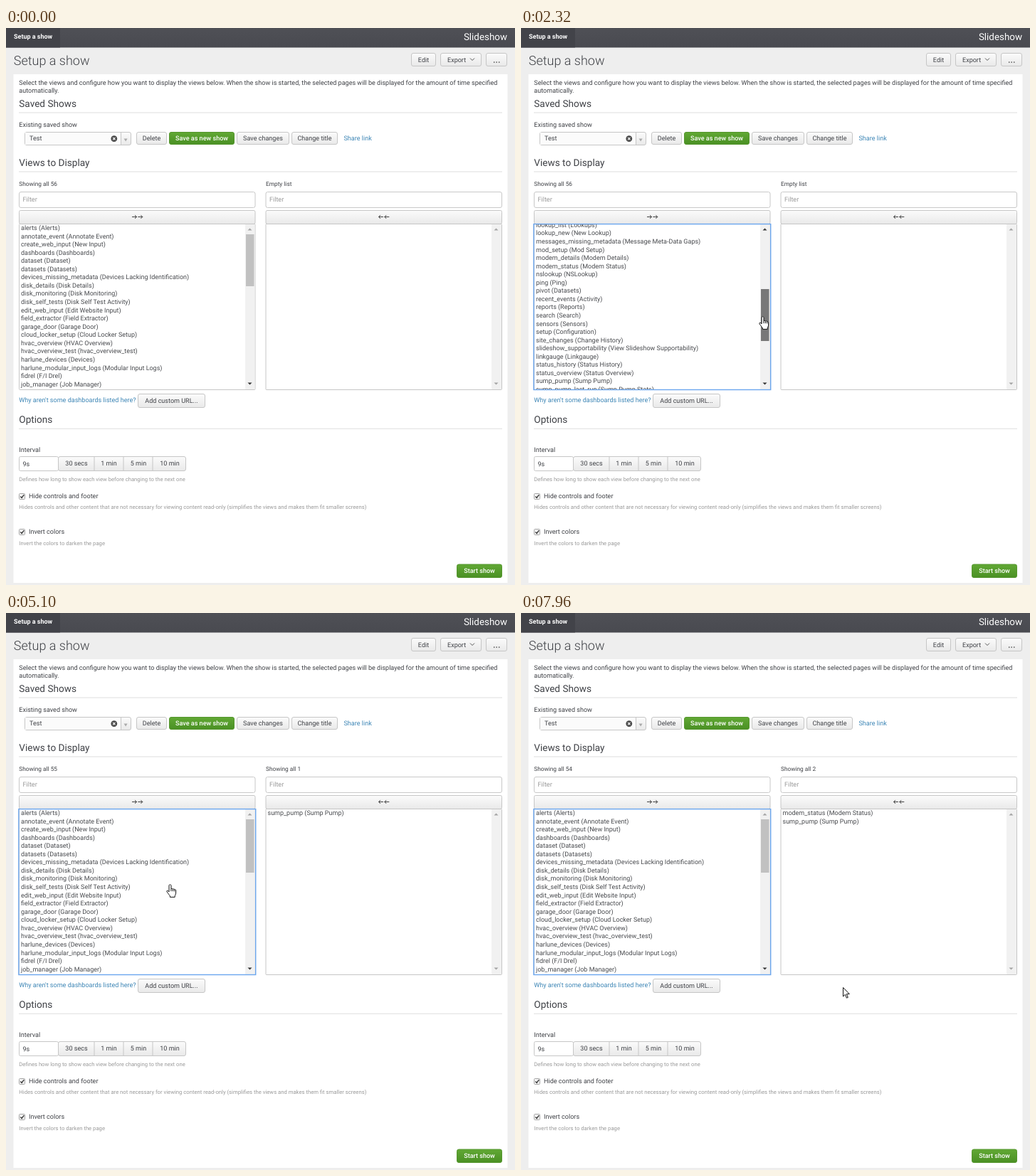
Write an HTML page that moves like this. It is 715 by 783 pixels and loops after 8000 ms.

```html
<!DOCTYPE html>
<html lang="en">
<head>
<meta charset="utf-8">
<title>Setup a show</title>
<style>
html, body { margin: 0; width: 100%; height: 100%; overflow: hidden; background: #eee; }
svg { display: block; width: 100%; height: 100%; }
text { font: 9.05px Roboto, sans-serif; fill: #3f4146; text-rendering: geometricPrecision; }
.mid { text-anchor: middle; }
.row { font-size: 9px; fill: #484a4e; }
.small { font-size: 8.3px; }
.help { font-size: 7.7px; fill: #9a9a9a; }
.hint { fill: #999; }
.head { font-size: 13.6px; }
.title { font-size: 18px; font-weight: 300; }
.link { fill: #3c85b5; }
.tab { font-size: 9px; font-weight: 700; fill: #fff; }
.app { font-size: 13.4px; fill: #fff; text-anchor: end; }
.go { fill: #fff; font-weight: 500; }
</style>
</head>
<body>
<svg id="stage" viewBox="0 0 715 783" xmlns="http://www.w3.org/2000/svg">
  <defs>
    <linearGradient id="bar" x2="0" y2="1"><stop stop-color="#4f5056"/><stop offset="1" stop-color="#494a50"/></linearGradient>
    <linearGradient id="grey" x2="0" y2="1"><stop stop-color="#fbfbfb"/><stop offset="1" stop-color="#e9e9e9"/></linearGradient>
    <linearGradient id="green" x2="0" y2="1"><stop stop-color="#61a834"/><stop offset="1" stop-color="#4a9024"/></linearGradient>
    <clipPath id="clip"><rect x="19" y="276" width="317" height="232"/></clipPath>
  </defs>
</svg>
<script>
const NS = 'http://www.w3.org/2000/svg';
const stage = document.getElementById('stage');

function add(tag, attrs, parent = stage) {
  const el = document.createElementNS(NS, tag);
  for (const k in attrs) el.setAttribute(k, attrs[k]);
  return parent.appendChild(el);
}
function label(x, y, str, cls = '', parent = stage) {
  const el = add('text', { x, y, class: cls }, parent);
  el.textContent = str;
  return el;
}
function box(x, y, w, h, fill, stroke, rx = 0) {
  const o = stroke ? 0.5 : 0;
  return add('rect', { x: x + o, y: y + o, width: w - 2 * o, height: h - 2 * o, fill, stroke: stroke || 'none', rx });
}
function line(d, stroke, width = 1) {
  return add('path', { d, stroke, fill: 'none', 'stroke-width': width });
}
function button(x, y, w, h, str, primary) {
  box(x, y, w, h, primary ? 'url(#green)' : 'url(#grey)', primary ? '#55962e' : '#c6c6c6', 2.5);
  if (str) label(x + w / 2, y + h / 2 + 3.1, str, primary ? 'mid go' : 'mid');
}
function triangle(x, y, dir, fill) {
  return add('path', { d: `M${x - 3} ${y + 1.5 * dir}h6l-3 ${-3 * dir}z`, fill });
}
function section(y, str) {
  label(18.3, y, str, 'head');
  box(18, y + 8, 679, 1, '#dedede');
}
function check(y, str, help, helpY) {
  box(18, y, 9, 9, '#f4f4f4', '#a5a5a5', 1);
  line(`M20.3 ${y + 4.6}l1.8 1.9 3.2-4.3`, '#333', 1.4);
  label(32, y + 7.2, str);
  label(18.3, helpY, help, 'help');
}

// Page header
box(0, 0, 715, 27.5, 'url(#bar)');
box(0, 0, 76, 27.5, '#424349');
label(11, 15, 'Setup a show', 'tab');
label(704, 16.6, 'Slideshow', 'app');
label(10.8, 52, 'Setup a show', 'title');
button(569, 35, 35, 19, 'Edit');
button(610, 35, 58, 19);
label(620, 47.6, 'Export');
line('M652 42.5l3 3 3-3', '#555');
button(674, 35, 30, 19);
[685, 688.5, 692].forEach(x => box(x, 47.4, 1.4, 1.4, '#444'));

// Panel
box(10.5, 65, 694, 715, '#fff');
label(18.3, 80, 'Select the views and configure how you want to display the views below. When the show is started, the selected pages will be displayed for the amount of time specified');
label(18.3, 91.4, 'automatically.');
section(110.5, 'Saved Shows');
label(18.3, 138.5, 'Existing saved show');
button(26, 146, 150, 19);
box(27, 147, 134, 17, '#fbfbfb');
box(161, 147, 1, 17, '#c6c6c6');
label(33, 158.2, 'Test');
add('circle', { cx: 151.8, cy: 155.6, r: 4.4, fill: '#4a4a4a' });
line('M150.1 153.9l3.4 3.4m0-3.4l-3.4 3.4', '#fff', 1.1);
add('path', { d: 'M165.6 155.5h5l-2.5 4z', fill: '#aaa' });
button(183, 146, 43, 18, 'Delete');
button(229, 146, 92, 18, 'Save as new show', true);
button(324, 146, 74, 18, 'Save changes');
button(401, 146, 65, 18, 'Change title');
label(474.5, 158.2, 'Share link', 'link');
section(193.5, 'Views to Display');

const counts = [18.3, 365].map(x => label(x, 222, '', 'small'));
for (const x of [18, 364.5]) {
  box(x, 230, 332.5, 23, '#fff', '#c8c8c8', 2.5);
  label(x + 5.5, 244, 'Filter', 'hint');
  box(x, 256, 332.5, 20, 'url(#grey)', '#c6c6c6', 2);
}
for (const x of [177, 185.3]) line(`M${x} 265.5h6.5m-2.5-2.5l2.5 2.5-2.5 2.5`, '#444');
for (const x of [523.5, 531.8]) line(`M${x + 6.5} 265.5h-6.5m2.5-2.5l-2.5 2.5 2.5 2.5`, '#444');

box(364.5, 275, 332.5, 234, '#fff', '#c6c6c6', 1);
box(682, 276, 14, 232, '#f1f1f1');
triangle(688.5, 283, 1, '#a3a3a3');
triangle(688.5, 500, -1, '#a3a3a3');

box(18, 275, 332.5, 234, '#fff', '#c6c6c6', 1);
box(336, 276, 13.5, 232, '#f1f1f1');
const upArrow = triangle(342.5, 283, 1, '#a3a3a3');
triangle(342.5, 500, -1, '#333');
const thumb = box(337, 290, 11.5, 73, '#c1c1c1');
const focusRing = add('rect', { x: 17.9, y: 275.6, width: 332.8, height: 232.9, fill: 'none', stroke: '#6ba6ee', 'stroke-width': 1.4 });

label(18.3, 526, "Why aren't some dashboards listed here?", 'link');
button(185, 514, 95, 20, 'Add custom URL...');
section(554.8, 'Options');
label(18.3, 596, 'Interval');
button(73, 602, 180, 21);
box(18, 602, 56, 21, '#fff', '#c6c6c6', 2);
label(23.5, 615.6, '9s');
[124, 165, 206].forEach(x => box(x - 0.5, 603, 1, 19, '#c6c6c6'));
[[99, '30 secs'], [144.5, '1 min'], [186, '5 min'], [230, '10 min']].forEach(([x, s]) => label(x, 615.2, s, 'mid'));
label(18.3, 636.6, 'Defines how long to show each view before changing to the next one', 'help');
check(654, 'Hide controls and footer', 'Hides controls and other content that are not necessary for viewing content read-only (simplifies the views and makes them fit smaller screens)', 676);
check(704, 'Invert colors', 'Invert the colors to darken the page', 726.5);
button(633, 753.5, 64, 19.5, 'Start show', true);

// Lists
const views = `alerts (Alerts)
annotate_event (Annotate Event)
create_web_input (New Input)
dashboards (Dashboards)
dataset (Dataset)
datasets (Datasets)
devices_missing_metadata (Devices Lacking Identification)
disk_details (Disk Details)
disk_monitoring (Disk Monitoring)
disk_self_tests (Disk Self Test Activity)
edit_web_input (Edit Website Input)
field_extractor (Field Extractor)
garage_door (Garage Door)
cloud_locker_setup (Cloud Locker Setup)
hvac_overview (HVAC Overview)
hvac_overview_test (hvac_overview_test)
harlune_devices (Devices)
harlune_modular_input_logs (Modular Input Logs)
fidrel (F/I Drel)
job_manager (Job Manager)
lookup_edit (Lookup Edit)
lookup_list (Lookups)
lookup_new (New Lookup)
messages_missing_metadata (Message Meta-Data Gaps)
mod_setup (Mod Setup)
modem_details (Modem Details)
modem_status (Modem Status)
nslookup (NSLookup)
ping (Ping)
pivot (Datasets)
recent_events (Activity)
reports (Reports)
search (Search)
sensors (Sensors)
setup (Configuration)
site_changes (Change History)
slideshow_supportability (View Slideshow Supportability)
linkgauge (Linkgauge)
status_history (Status History)
status_overview (Status Overview)
sump_pump (Sump Pump)
sump_pump_last_run (Sump Pump Stats)
tandemveris (TandemVeris)
thermostat (Thermostat)
thermostats (Thermostats)
thremo_new (Thermostat)
traceroute (Traceroute)`.split('\n');
const SUMP = views[40], MODEM = views[26];
const ROW = 11.56, RATIO = 3.19;

const list = add('g', { 'clip-path': 'url(#clip)' });
const mark = add('rect', { x: 19, width: 317, height: ROW, fill: '#1e90ff' }, list);
const rows = Array.from({ length: 22 }, () => label(21, 0, '', 'row', list));
const chosen = [0, 1].map(i => label(367.5, 284 + i * ROW, '', 'row'));

const ink = { fill: '#fff', stroke: '#111', 'stroke-linejoin': 'round' };
const hand = add('path', { ...ink, d: 'M5.5.8C6.4.8 7 1.4 7 2.2v4.6c.3-.6 2.1-.6 2.4.4.5-.6 2-.5 2.3.5.6-.4 1.9 0 1.9 1.3v4.2c0 1.6-1.4 2.6-1.4 3.6v1.6H5.4v-1.6C4.6 15.9 2.6 13 1 10.8.3 9.6 1.6 8.7 2.6 9.5L4 11V2.2C4 1.4 4.6.8 5.5.8zM7 6.8v3.4M9.4 7.2v3M11.7 7.8v2.6' });
const arrow = add('path', { ...ink, d: 'M.5.5V13l2.9-2.7 2 4.9 1.9-.8-2-4.8h4z' });

// Bursts of movement: first step, last step, number of steps
const bursts = [[0, 0, 1], [70, 490, 6], [1010, 1170, 3], [1320, 1320, 1], [1550, 2320, 11],
  [2400, 2700, 5], [3410, 3870, 7], [4100, 4330, 4], [4480, 4480, 1], [4710, 5480, 11],
  [5560, 6170, 9], [6320, 6800, 7], [7260, 7330, 2], [7580, 7960, 6]];

// Pointer path: time, x, y
const path = [[70, 480, 607], [490, 333, 329], [940, 333, 329], [1170, 336, 328], [1320, 336, 327.6],
  [1480, 337, 327.6], [1750, 339, 346], [1935, 336, 368.1], [2320, 334, 405], [2700, 330, 425.5],
  [3340, 330, 425.5], [3870, 79, 434], [4100, 78, 433], [4640, 78, 433], [5480, 339, 339.8],
  [5500, 340, 339.8], [5710, 336, 379], [6170, 339, 414.7], [6250, 339, 414.7], [6800, 71, 339],
  [7510, 71, 339], [7960, 452, 526]];

function snap(t) {
  const [a, b, n] = bursts.filter(s => s[0] <= t).pop();
  if (n === 1) return a;
  const dt = (b - a) / (n - 1);
  return a + Math.min(n - 1, Math.floor((t - a) / dt + 0.1)) * dt;
}
function pointer(t) {
  const i = path.findIndex(p => p[0] > t);
  if (i < 0) return path[path.length - 1].slice(1);
  if (i === 0) return path[0].slice(1);
  const [t0, x0, y0] = path[i - 1], [t1, x1, y1] = path[i];
  let k = (t - t0) / (t1 - t0);
  if (Math.abs(x1 - x0) > 60) k = k * k * (3 - 2 * k);
  return [x0 + (x1 - x0) * k, y0 + (y1 - y0) * k];
}
function scrollAt(t) {
  if (t >= 1550 && t < 4480) return (pointer(Math.min(t, 2700))[1] - 327.6) * RATIO;
  if (t >= 5560 && t < 7329) return (pointer(Math.min(t, 6170))[1] - 339.8) * RATIO;
  return 0;
}
function setText(el, str) {
  if (el.textContent !== str) el.textContent = str;
}
function show(el, on) {
  el.setAttribute('visibility', on ? 'visible' : 'hidden');
}

function draw(time) {
  const t = snap(time);
  const picked = t >= 7329 ? [MODEM, SUMP] : t >= 4480 ? [SUMP] : [];
  const items = views.filter(v => !picked.includes(v));
  const scroll = scrollAt(t);
  const active = t >= 4250 && t < 4480 ? SUMP : t >= 7260 && t < 7329 ? MODEM : null;

  setText(counts[0], 'Showing all ' + (56 - picked.length));
  setText(counts[1], picked.length ? 'Showing all ' + picked.length : 'Empty list');
  chosen.forEach((el, i) => setText(el, picked[i] || ''));

  const first = Math.floor(scroll / ROW);
  rows.forEach((el, i) => {
    const name = items[first + i] || '';
    setText(el, name);
    el.setAttribute('y', 284 + (first + i) * ROW - scroll);
    el.style.fill = name && name === active ? '#fff' : '';
  });
  show(mark, active);
  if (active) mark.setAttribute('y', 275.4 + items.indexOf(active) * ROW - scroll);

  const [x, y] = pointer(t).map(Math.round);
  const top = Math.round(290 + scroll / RATIO), size = picked.length ? 75 : 73;
  const drag = (t >= 1550 && t < 3410) || (t >= 5560 && t < 6320);
  const over = t >= 70 && x + 5 >= 337 && x + 5 < 349 && y >= top && y < top + size;
  thumb.setAttribute('y', top);
  thumb.setAttribute('height', size);
  thumb.setAttribute('fill', drag ? '#787878' : over ? '#a8a8a8' : '#c1c1c1');
  upArrow.setAttribute('fill', scroll > 0 ? '#333' : '#a3a3a3');
  show(focusRing, t >= 1550);

  const inList = x < 350 && y > 275 && y < 508;
  show(hand, t >= 70 && inList);
  show(arrow, t >= 70 && !inList);
  (inList ? hand : arrow).setAttribute('transform', `translate(${x} ${y})`);
}

const start = performance.now();
function tick() {
  draw((performance.now() - start) % 8000);
  requestAnimationFrame(tick);
}
tick();
</script>
</body>
</html>
```
